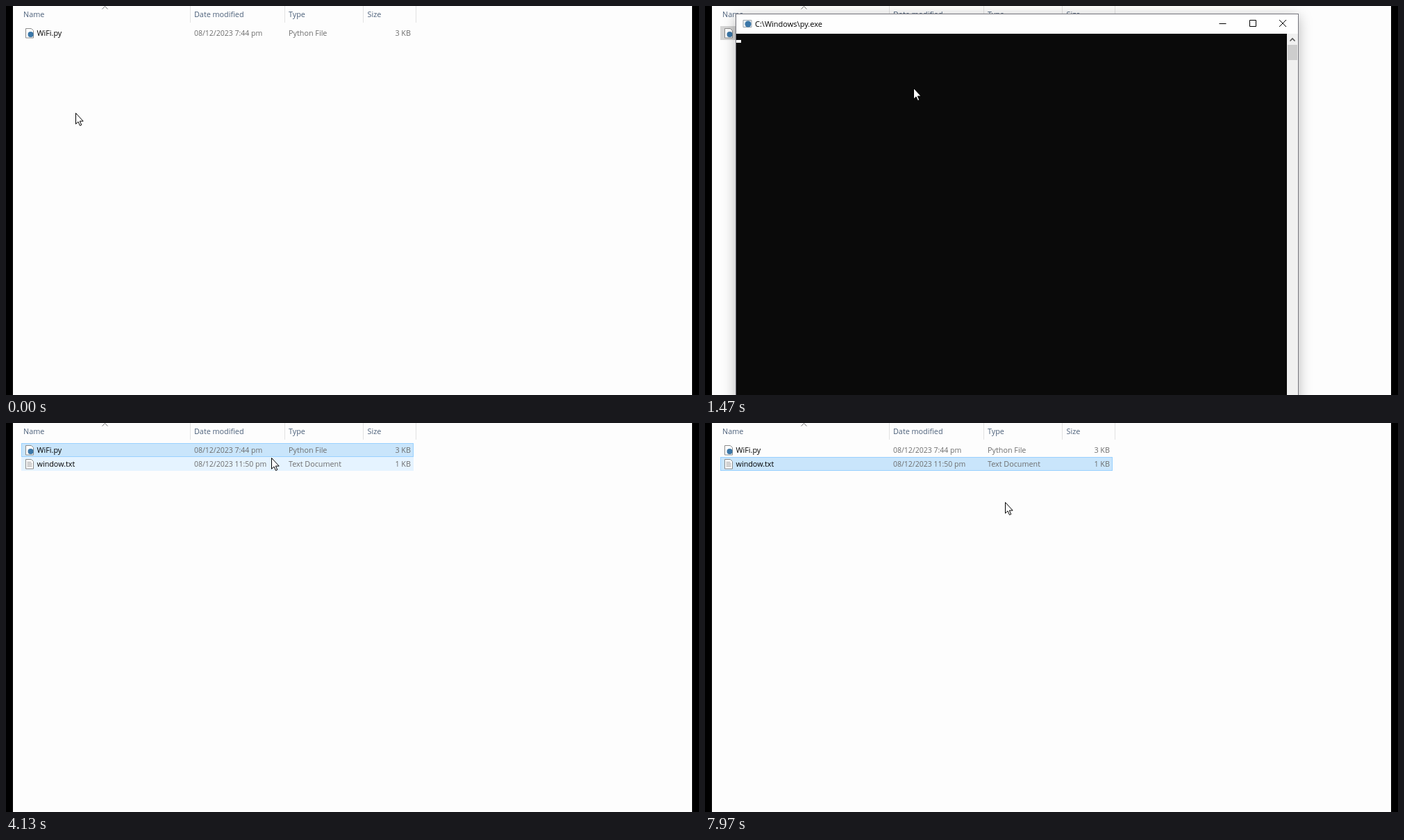
Animation, 998 px wide and 561 px high, one loop 8000 ms. Source, as an HTML page:

```html
<!DOCTYPE html>
<html lang="en">
<head>
<meta charset="utf-8">
<title>Script run</title>
<style>
  html, body { margin: 0; width: 100%; height: 100%; overflow: hidden; background: #000; }
  #stage { position: relative; width: 998px; height: 561px; overflow: hidden; background: #fdfdfd;
    font: 11px "Open Sans", sans-serif; color: #000; }
  #stage > svg { position: absolute; left: 0; top: 0; overflow: visible; }
  .bar { position: absolute; top: 0; width: 10px; height: 561px; background: #000; }
  #list text { font-size: 10.8px; }
  #list .head { fill: #4c607a; }
  #list .info { fill: #6d6d6d; }
  #list .date { font-size: 10.5px; }
  .window { position: absolute; box-sizing: border-box; background: #fefefe; border: 1px solid #74747c;
    box-shadow: 0 4px 18px rgba(0, 0, 0, .28); }
  .window > * { position: absolute; }
  .title { top: 6px; left: 27px; line-height: 15px; white-space: pre; }
  .icon { left: 9px; top: 7px; }
  .buttons { top: 0; right: 0; }
  .buttons path { fill: none; stroke: #000; }
  pre { margin: 0; font-family: "Noto Sans Mono", monospace; }
  #console { left: 44px; top: 11px; width: 811px; height: 560px; }
  #screen { left: 0; top: 28px; width: 793px; height: 530px; background: #0a0a0a; }
  #output { left: -.5px; top: 28px; font-size: 11px; line-height: 13.2px; color: #13a10e; }
  #prompt { left: 0; top: 37px; width: 7px; height: 4px; background: #fff; }
  .scroll { right: 0; width: 16px; bottom: 0; background: #f0f0f0; }
  .scroll svg { position: absolute; left: 0; top: 0; }
  #editor { left: 29px; top: 132px; width: 893px; height: 580px; }
  #editor span { top: 30px; font-size: 10.7px; line-height: 15px; }
  #rule { left: 0; right: 0; top: 46px; height: 1px; background: #ececf2; }
  #note { left: 3.5px; top: 46.5px; font-size: 12.63px; line-height: 17px; }
  #note div { height: 17px; }
  #note b { display: inline-block; height: 17px; font-weight: 400; color: #fff; background: #0078d7; }
  #caret { left: 4px; top: 48px; width: 1px; height: 15px; background: #000; }
</style>
</head>
<body>
<div id="stage">
  <svg id="list" width="998" height="561"></svg>

  <div class="window" id="console">
    <svg class="icon" width="15" height="14">
      <path d="M1 1.5h12v10H1z" fill="#eef2f5" stroke="#9aa5ad"/><circle cx="8" cy="7" r="4.5" fill="#3b77a8"/>
    </svg>
    <div class="title">C:\Windows\py.exe</div>
    <div id="screen"></div>
    <pre id="output"></pre>
    <div id="prompt"></div>
    <div class="scroll" style="top:28px"><svg width="16" height="60">
      <path d="M4.5 10.5l3.5-3.5 3.5 3.5" fill="none" stroke="#555" stroke-width="1.6"/>
      <path d="M1 16h14v22H1z" fill="#cdcdcd"/></svg></div>
  </div>

  <div class="window" id="editor">
    <svg class="icon" width="15" height="15"><rect x="1" y="1" width="12" height="13" fill="#7fb4c9"/></svg>
    <div class="title">window.txt - Plumjot</div>
    <span style="left:6px">File</span><span style="left:36px">Edit</span><span style="left:68px">Format</span>
    <span style="left:118px">View</span><span style="left:154px">Help</span>
    <div id="rule"></div>
    <pre id="note"></pre>
    <div id="caret"></div>
    <div class="scroll" style="top:47px"><svg width="16" height="20">
      <path d="M4.5 10l3.5-3.5 3.5 3.5" fill="none" stroke="#bbb" stroke-width="1.5"/></svg></div>
  </div>

  <div class="bar" style="left:0"></div>
  <div class="bar" style="left:988px"></div>
  <svg width="998" height="561"><g id="pointer">
    <path id="arrow" d="M.5.5V16.2L4 12.9l2.5 5.6 2.3-1-2.5-5.4h4.9z" fill="#fff" stroke="#000"/>
    <path id="beam" d="M-3.5-7.5h2.5l1 1 1-1h2.5M0-6.5v13M-3.5 7.5h2.5l1-1 1 1h2.5" fill="none" stroke="#000" stroke-width="1.3"/>
  </g></svg>
</div>

<script type="text/plain" id="banner">
                      :::!~!!!!!:.
                  .xUHWH!! !!?M88WHX:.
                .X*#M@$!!  !X!M$$$$$$WWx:.
               :!!!!!!?H! :!$!$$$$$$$$$$8X:
              !!~  ~:~!! :~!$!#$$$$$$$$$$8X:
             :!~::!H!<   ~.U$X!?R$$$$$$$$MM!
             ~!~!!!!~~ .:XW$$$U!!?$$$$$$RMM!
               !:~~~ .:!M"T#$$$$WX??#MRRMMM!
               ~?WuxiW*`   `"#$$$$8!!!!??!!!
             :X- M$$$$       `"T#$T~!8$WUXU~
            :%`  ~#$$$m:        ~!~ ?$$$$$$
          :!`.-   ~T$$$$8xx.  .xWW- ~""##*"
.....   -~~:<` !    ~?T#$$@@W@*?$$      /`
W$@@M!!! .!~~ !!     .:XUW$W!~ `"~:    :
#"~~`.:x%`!!  !H:   !WM$$$$Ti.: .!WUn+!`
:::~:!!`:X~ .: ?H.!u "$$$B$$$!W:U!T$$M~
.~~   :X@!.-~   ?@WTWo("*$$$W$TH$! `
Wi.~!X$?!-~    : ?$$$B$Wu("**$RM!
$R@i.~~ !     :   ~$$$$$B$$en:``
?MXT@Wx.~    :     ~"##*$$$$M~


   _____                _           _   ____           ____       _ _ _
  / ____|              | |         | | |  _ \         / __ \     | (_) |
 | |     _ __ ___  __ _| |_ ___  __| | | |_) |_   _  | |  | |_ __| |_| |__
 | |    | '__/ _ \/ _` | __/ _ \/ _` | |  _ <| | | | | |  | | '__| | | '_ \
 | |____| | |  __/ (_| | ||  __/ (_| | | |_) | |_| | | |__| | |  | | | |_) |
  \_____|_|  \___|\__,_|\__\___|\__,_| |____/ \__, |  \____/|_|  |_|_|_.__/
                                               __/ |
                                              |___/
</script>

<script>
const $ = id => document.getElementById(id);
const LOOP = 8000;
const clamp = v => Math.max(0, Math.min(1, v));
const smooth = v => v * v * (3 - 2 * v);

const OPEN_CONSOLE = 1200, PRINT = 2000, DONE = 2560, DRAG = 2830, DRAG_END = 3030, CLOSE_CONSOLE = 3720;
const SELECT_TXT = 5000, OPEN_NOTE = 5310, MARK = 5850, MARK_END = 6400, CLOSE_NOTE = 7540;

// time, x, y of the pointer tip
const path = [
  [30, 100, 154], [630, 112, 42], [1200, 112, 42], [1270, 142, 67], [1470, 300, 118], [1700, 400, 150],
  [2000, 400, 150], [DRAG, 500, 26], [DRAG_END, 532, 30], [3300, 832, 34], [3550, 866, 30],
  [CLOSE_CONSOLE, 866, 30], [4400, 126, 60], [5380, 126, 60], [5700, 36, 188], [MARK, 36, 188],
  [MARK_END, 342, 308], [6770, 692, 202], [7000, 660, 250], [7400, 899, 146], [CLOSE_NOTE, 899, 146],
  [7970, 432, 114], [LOOP, 432, 114]
];

function pointerAt(t) {
  const i = path.findIndex(p => p[0] > t);
  if (i < 1) return path[0].slice(1);
  const [t0, x0, y0] = path[i - 1], [t1, x1, y1] = path[i];
  const k = smooth((t - t0) / (t1 - t0));
  return [x0 + (x1 - x0) * k, y0 + (y1 - y0) * k];
}

const rowMarkup = (id, y, name, date, type, size, icon) => `<g id="${id}">
  <rect x="22.5" y="${y - 9.5}" width="564" height="19"/>${icon}
  <text x="44.5" y="${y + 4}">${name}</text>
  <text class="info date" x="271" y="${y + 4}">${date}</text>
  <text class="info" x="407" y="${y + 4}">${type}</text>
  <text class="info" x="583" y="${y + 4}" text-anchor="end">${size}</text></g>`;
const page = y => `<path d="M28.5 ${y}h8l3 3v10.5h-11z" fill="#fff" stroke="#8b8b8b"/>`;

$('list').innerHTML =
  [['Name', 25], ['Date modified', 271], ['Type', 407], ['Size', 520.5]]
    .map(([s, x]) => `<text class="head" x="${x}" y="16">${s}</text>`).join('') +
  '<path d="M265.5 0v24M401.5 0v24M514.5 0v24M590.5 0v24" stroke="#e2e2e2"/>' +
  '<path d="M138.5 4.5l4-4 4 4" fill="none" stroke="#777"/>' +
  rowMarkup('script', 39, 'WiFi.py', '08/12/2023 7:44 pm', 'Python File', '3 KB',
    page(32.5) + '<circle cx="35.5" cy="41" r="4" fill="#3b77a8"/>') +
  rowMarkup('report', 59, 'window.txt', '08/12/2023 11:50 pm', 'Text Document', '1 KB',
    page(52.5) + '<path d="M30.5 56.5h6M30.5 58.5h7M30.5 60.5h7M30.5 62.5h7" stroke="#a5a5a5"/>');

const frames = ['console', 'editor'].map($);
for (const w of frames) w.insertAdjacentHTML('beforeend',
  `<svg class="buttons" width="130" height="28"><rect width="43" height="28"/>
   <path d="M16.5 13.5h10M60.5 8.5h9v9h-9z"/><path class="cross" d="M103 8l10 10M113 8l-10 10"/></svg>`);

const banner = $('banner').textContent;
const ending = '\nDONE\nExecution Time 0.561 seconds\nPress Enter to close ...';
const dashes = '-'.repeat(40);
const entry = (name, key) => name.padEnd(20) + '|  ' + key;
const note = [dashes, 'Wifi Password Grabber CREATED BY ORLIB', 'USERNAME :: Bluedesk4',
  entry('7qvD_Lane', 'telescope?'), entry('QVNM', '1020304050'), dashes, 'DONE', dashes];

function setText(el, prop, value) {
  if (el.shown !== value) el[prop] = el.shown = value;
}

function paintRow(id, state) {
  const [fill, stroke] = {
    none: ['none', 'none'], hover: ['#e5f3ff', '#e5f3ff'],
    active: ['#c9e5fb', '#99d1ff'], inactive: ['#d5d5d5', '#d5d5d5']
  }[state];
  const box = $(id).querySelector('rect');
  box.setAttribute('fill', fill);
  box.setAttribute('stroke', stroke);
}

// Opening grows and fades in, closing shrinks and fades out.
function paintWindow(el, t, open, close, dx, dy, [px, py]) {
  const a = clamp((t - open) / 200), c = clamp((t - close) / 180);
  const opacity = Math.min(1, a * 1.4) * (1 - c);
  const scale = 1 - .09 * (1 - a) ** 3 - .09 * c * c;
  el.style.opacity = opacity;
  el.style.visibility = opacity ? 'visible' : 'hidden';
  el.style.transform = `translate(${dx}px, ${dy}px) scale(${scale})`;

  const right = el.offsetLeft + el.offsetWidth + dx - 1, top = el.offsetTop + dy;
  const button = Math.floor((px - right + 130) / 43);
  const hot = opacity > .9 && py > top && py < top + 29 && button >= 0 && button < 3;
  const box = el.querySelector('.buttons rect');
  box.setAttribute('x', button * 43 + (button === 2 ? 1 : 0));
  box.setAttribute('fill', !hot ? 'none' : button === 2 ? '#e81123' : '#f2f2f2');
  el.querySelector('.cross').style.stroke = hot && button === 2 ? '#fff' : '#000';
}

function markedNote(t, [x, y]) {
  const row = t < MARK ? -1 : t < MARK_END ? Math.floor((y - 179.5) / 17) : note.length;
  const col = Math.max(0, Math.round((x - 33.5) / 7.58));
  return note.map((line, i) => {
    const n = i < row ? line.length : i === row ? col : 0;
    return `<div>${n ? `<b>${line.slice(0, n)}</b>` : ''}${line.slice(n)}</div>`;
  }).join('');
}

function draw(t) {
  const tip = pointerAt(t), [x, y] = tip;
  const over = (top, bottom) => x > 22 && x < 587 && y > top && y < bottom;
  const noteOpen = t >= OPEN_NOTE && t < CLOSE_NOTE;
  const noteFront = t >= OPEN_NOTE + 100 && t < CLOSE_NOTE;

  paintRow('script', t >= SELECT_TXT ? 'none'
    : t >= OPEN_CONSOLE && t < CLOSE_CONSOLE ? 'inactive'
    : t >= 800 ? 'active' : over(29, 49) ? 'hover' : 'none');
  paintRow('report', t >= SELECT_TXT ? (noteFront ? 'inactive' : 'active')
    : t > CLOSE_CONSOLE && over(49, 69) ? 'hover' : 'none');
  $('report').style.display = t >= DONE ? '' : 'none';

  const drag = smooth(clamp((t - DRAG) / (DRAG_END - DRAG)));
  paintWindow(frames[0], t, OPEN_CONSOLE, CLOSE_CONSOLE, 32 * drag, 4 * drag, tip);
  paintWindow(frames[1], t, OPEN_NOTE, CLOSE_NOTE, 0, 0, tip);

  setText($('output'), 'textContent', t < PRINT ? '' : t < DONE ? banner : banner + ending);
  $('prompt').style.display = t < PRINT ? '' : 'none';
  setText($('note'), 'innerHTML', markedNote(t, tip));
  $('caret').style.display = t < MARK ? '' : 'none';

  const inText = noteOpen && y > 179 && x > 30 && x < 906;
  $('arrow').style.display = inText ? 'none' : '';
  $('beam').style.display = inText ? '' : 'none';
  $('pointer').setAttribute('transform', `translate(${Math.round(x)} ${Math.round(y)})`);
}

const start = performance.now();
function tick() {
  draw((performance.now() - start) % LOOP);
  requestAnimationFrame(tick);
}
tick();
</script>
</body>
</html>
```
